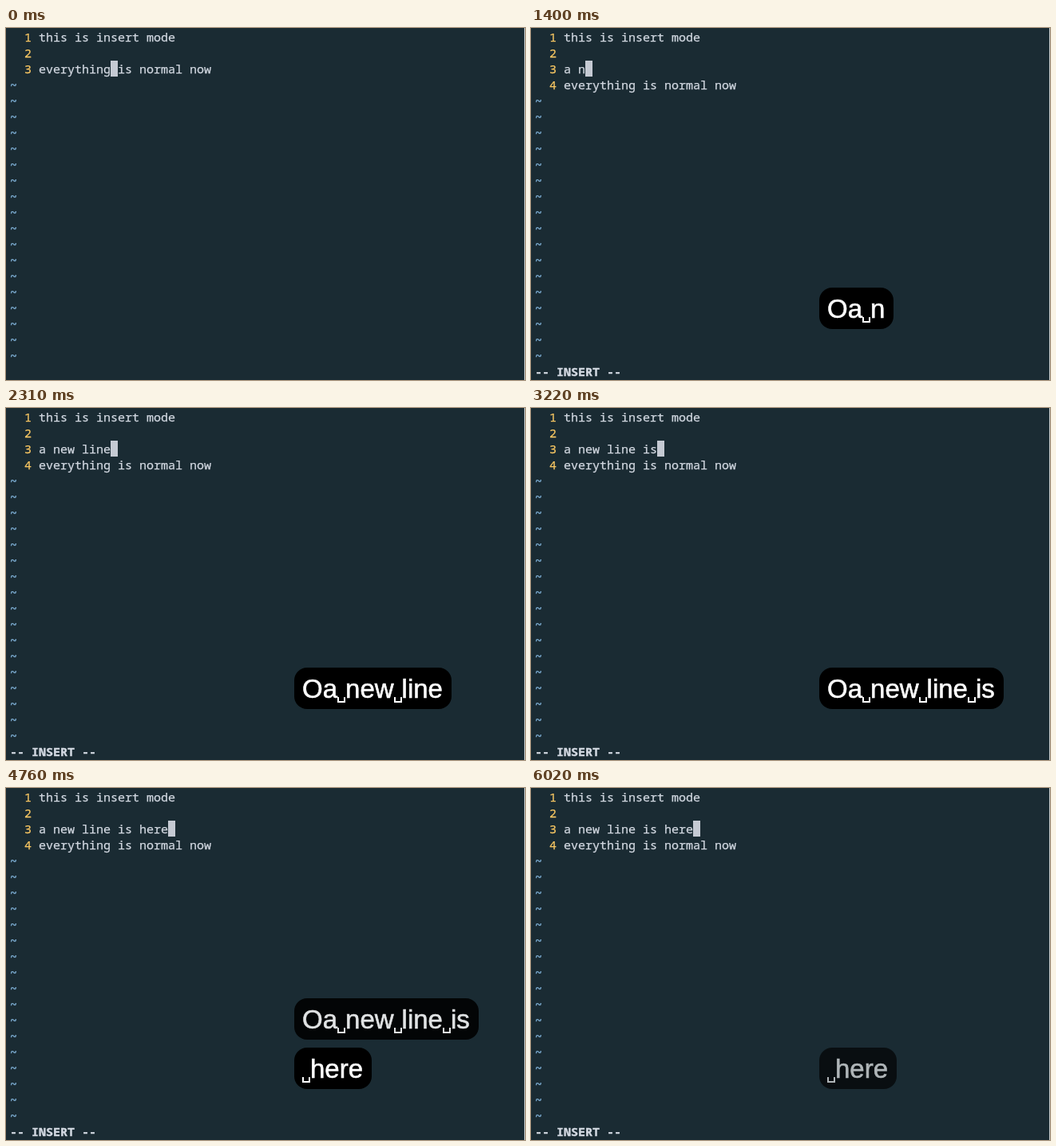
Animation of 650x442 px, one loop 6090 ms. Source, as an HTML page:

```html
<!DOCTYPE html>
<html lang="en">
<head>
<meta charset="utf-8">
<title>Opening a line above</title>
<style>
  html, body { margin: 0; width: 100%; height: 100%; overflow: hidden; background: #c4c9cb; }
  #editor {
    position: absolute; left: 0; top: 0; width: 649px; height: 442px;
    background: #1a2b33; overflow: hidden;
    font: 500 15px/20px "Noto Sans Mono", "DejaVu Sans Mono", monospace;
    color: #d3d9e2; white-space: pre; -webkit-text-stroke: 0.25px;
  }
  .row { position: absolute; left: 5px; height: 20px; }
  .number { color: #fac863; }
  .tilde { color: #7fb0d6; -webkit-text-stroke: 0.4px; }
  #status { font-weight: 800; -webkit-text-stroke: 0.4px; }
  #cursor { position: absolute; width: 9px; height: 20px; top: 41px; background: #c5cad3; }
  .keys {
    position: absolute; left: 361px; height: 52px; box-sizing: border-box;
    padding: 0 11px 0 10px; border-radius: 16px; background: #000; color: #fff;
    font: 33px/54px "Liberation Sans", Arial, sans-serif; white-space: nowrap;
    -webkit-text-stroke: 0.6px;
  }
  .space {
    display: inline-block; box-sizing: border-box; width: 10px; height: 7px;
    border: solid #fff; border-width: 0 2px 2px; vertical-align: -6px;
  }
</style>
</head>
<body>
<div id="editor"></div>
<script>
const LOOP = 6090, STEP = 70, ROW = 20, COLUMN = 9, LEFT = 5;
const LAST_ROW = 21, FADE = 200;

// Each key with the moment it is pressed.
const firstKeys = [
  ["O", 700], ["a", 980], [" ", 1190], ["n", 1400], ["e", 1540], ["w", 1680], [" ", 1820],
  ["l", 1960], ["i", 2030], ["n", 2170], ["e", 2310], [" ", 2380], ["i", 2450], ["s", 2590]
];
const secondKeys = [[" ", 3290], ["h", 3430], ["e", 3570], ["r", 3710], ["e", 3850]];
const opened = firstKeys[0][1], secondStart = secondKeys[0][1];

const editor = document.getElementById("editor");

function add(className, top) {
  const element = document.createElement("div");
  element.className = className;
  if (top !== undefined) element.style.top = top + "px";
  editor.append(element);
  return element;
}

const rows = Array.from({ length: LAST_ROW }, (_, i) => add("row", 1 + i * ROW));
const status = add("row", 1 + LAST_ROW * ROW);
status.id = "status";
status.textContent = "-- INSERT --";
const cursor = add("");
cursor.id = "cursor";
const firstBox = add("keys"), secondBox = add("keys", 326);

const typed = (keys, time) => keys.filter(key => key[1] <= time).map(key => key[0]).join("");

function showKeys(box, text, time, fadeStart) {
  const opacity = Math.max(0, Math.min(1, 1 - (time - fadeStart) / FADE));
  box.style.display = text && opacity ? "block" : "none";
  box.style.opacity = opacity;
  box.innerHTML = text.replaceAll(" ", '<span class="space"></span>');
}

function draw(time) {
  const inserting = time >= opened;
  const first = typed(firstKeys, time), second = typed(secondKeys, time);
  const newLine = first.slice(1) + second;
  const lines = ["this is insert mode", "", "everything is normal now"];
  if (inserting) lines.splice(2, 0, newLine);

  rows.forEach((row, i) => {
    row.innerHTML = i < lines.length
      ? `<span class="number">${String(i + 1).padStart(3)}</span> ${lines[i]}`
      : '<span class="tilde">~</span>';
  });
  status.style.display = inserting ? "block" : "none";
  const column = 4 + (inserting ? newLine.length : "everything".length);
  cursor.style.left = LEFT + column * COLUMN + "px";

  firstBox.style.top = (time < secondStart ? 326 : 264) + "px";
  showKeys(firstBox, first, time, 4734);
  showKeys(secondBox, second, time, 5950);
}

let shown = -1;
function tick() {
  const time = Math.floor((performance.now() % LOOP) / STEP) * STEP;
  if (time !== shown) draw(shown = time);
  requestAnimationFrame(tick);
}
tick();
</script>
</body>
</html>
```
